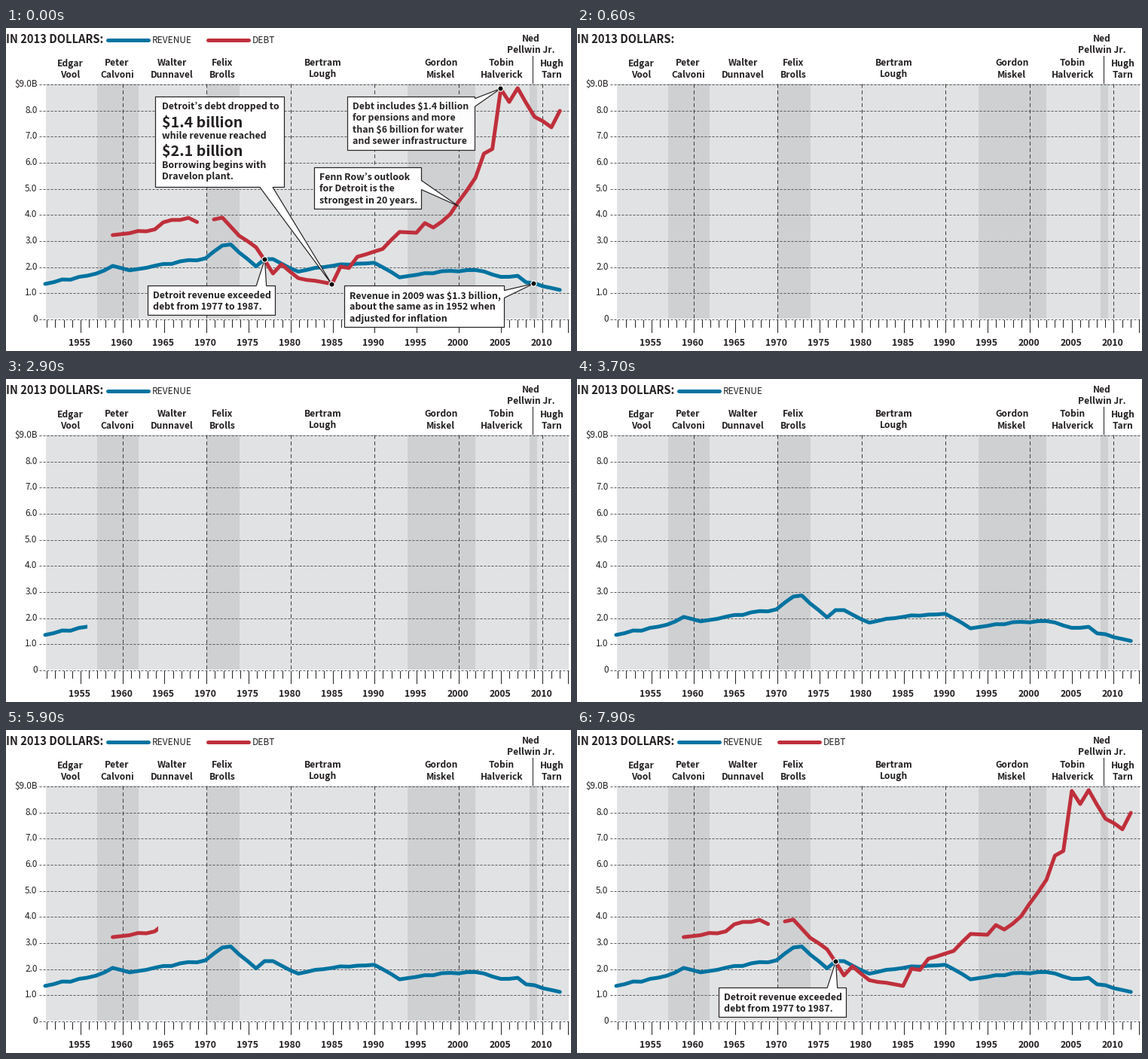
Recreate the animation shown at these times as a matplotlib script. Size 750 by 429 pixels, loop 8000 ms.

```python
import numpy as np
import matplotlib.pyplot as plt
from matplotlib.animation import FuncAnimation
from matplotlib.patches import Circle, Polygon, Rectangle

W, H, DPI = 750, 429, 64
PT = 72 / DPI  # points per pixel
STEP, FRAMES = 100, 80
TOP, BASE, UNIT = 74, 386, 34.67  # plot edges, pixels per billion
BLUE, RED = "#0073a0", "#bf2f3b"
LIGHT, DARK, INK = "#e1e2e3", "#cfd0d2", "#231f20"
TOP_SIDE, RIGHT_SIDE, BOTTOM_SIDE = range(3)

plt.rcParams["font.family"] = ["Noto Sans CJK JP", "Liberation Sans"]
rng = np.random.default_rng(4)

fig = plt.figure(figsize=(W / DPI, H / DPI), dpi=DPI, facecolor="white")
ax = fig.add_axes([0, 0, 1, 1])
ax.set_xlim(0, W)
ax.set_ylim(H, 0)
ax.axis("off")


def label(x, y, s, size=12, bold=True, ha="left", z=2):
    return ax.text(x, y, s, fontsize=size * PT, ha=ha, va="baseline",
                   weight="bold" if bold else "normal", color=INK,
                   zorder=z, parse_math=False)


def stroke(x, y, width=1, color=INK, z=1, **kw):
    return ax.plot(x, y, color=color, lw=width * PT, zorder=z, **kw)[0]


def year_x(year):
    return 98.4 + (year - 1955) * 11.155


def draw_terms():
    """Alternating bands, each with its mayor's name above the middle."""
    terms = [(1950.9, "Edgar", "Vool"), (1957, "Peter", "Calvoni"),
             (1962, "Walter", "Dunnavel"), (1970, "Felix", "Brolls"),
             (1974, "Bertram", "Lough"), (1994, "Gordon", "Miskel"),
             (2002, "Tobin", "Halverick"), (2008.5, "Ned", "Pellwin Jr."),
             (2009.4, "Hugh", "Tarn")]
    ends = [t[0] for t in terms[1:]] + [2013.1]
    for k, ((start, first, last), end) in enumerate(zip(terms, ends)):
        x0, x1 = year_x(start), year_x(end)
        ax.add_patch(Rectangle((x0, TOP), x1 - x0, BASE - TOP, lw=0,
                               fc=DARK if k % 2 else LIGHT, zorder=0))
        mid, y = (x0 + x1) / 2 - 1, 50.5
        if x1 - x0 < 20:  # too narrow: raise the name above a leader
            stroke([698.5, 698.5], [37, 73])
            mid, y = mid - 2, 18
        label(mid, y, first, ha="center")
        label(mid, y + 15, last, ha="center")


def draw_axes():
    for v in range(10):
        y = round(BASE - v * UNIT) + 0.5
        stroke([44, 747], [y, y], color="#58595b", ls=(0, (3, 2)))
        text = "$9.0B" if v == 9 else f"{v}.0" if v else "0"
        label(41.5, y + 3.5, text, 11.7, bold=False, ha="right")
    for year in range(1951, 2014):
        x = int(year_x(year)) + 0.5
        major = year % 5 == 0 or year == 2013
        stroke([x, x], [388, 404 if major else 397])
        if year % 5 == 0:
            label(x - 1, 421.5, str(year), 12.3, ha="center")
        if year % 10 == 0:
            stroke([x, x], [TOP, BASE], color="#3a3a3c", ls=(0, (5, 3.5)))


def legend(x, name, color):
    line = stroke([x + 2.5, x + 56.5], [15.5, 15.5], 5, color,
                  solid_capstyle="round")
    return [line, label(x + 62, 19.7, name, 11.9, bold=False)]


def series(points, color, z):
    """Yearly line through key points, with a slight wobble in between."""
    keys, values = zip(*points)
    years = np.arange(keys[0], keys[-1] + 1)
    wobble = rng.uniform(-0.04, 0.04, len(years))
    v = np.interp(years, keys, values) + wobble * ~np.isin(years, keys)
    return stroke(52 + (years - 1951) * 11.2, BASE - v * UNIT, 5, color, z,
                  solid_capstyle="round", solid_joinstyle="round")


def callout(box, side, span, tip, lines, dot=True, pad=7):
    """Note whose pointer leaves one side over a span of its length."""
    x0, y0, x1, y1 = box
    shape = [np.array(p) for p in [(x0, y0), (x1, y0), (x1, y1), (x0, y1)]]
    a, b = shape[side], shape[side + 1]
    shape[side + 1:side + 1] = [a + (b - a) * span[0], np.array(tip),
                                a + (b - a) * span[1]]
    parts = [ax.add_patch(Polygon(np.array(shape) + 0.5, fc="white", ec=INK,
                                  lw=1.2 * PT, zorder=6))]
    if dot:
        parts.append(ax.add_patch(Circle(np.add(tip, 0.5), 3.6, fc="black",
                                         ec="white", lw=1.2 * PT, zorder=7)))
    y = y0 + 2
    for text in lines:
        big = text.startswith("$")
        y += 23.5 if big else 15.2
        parts.append(label(x0 + pad, y, text, 19.6 if big else 12.35, z=8))
    return parts


def fade(parts, alpha):
    for p in parts:
        p.set_alpha(alpha)
        p.set_visible(alpha > 0)


def wipe(lines, edge):
    for line in lines:
        line.set_visible(edge > 0)
        line.set_clip_path(Rectangle((0, 0), max(edge, 1), H,
                                     transform=ax.transData))


draw_terms()
draw_axes()
label(0, 20.3, "IN 2013 DOLLARS:", 14.7)
revenue_key = legend(132, "REVENUE", BLUE)
debt_key = legend(265, "DEBT", RED)

revenue = [series([
    (1951, 1.33), (1957, 1.72), (1959, 2.02), (1961, 1.85), (1970, 2.31),
    (1972, 2.8), (1973, 2.84), (1976, 2.0), (1977, 2.28), (1978, 2.28),
    (1981, 1.8), (1985, 2.02), (1990, 2.14), (1993, 1.58), (1996, 1.74),
    (2002, 1.86), (2005, 1.6), (2007, 1.64), (2008, 1.39), (2012, 1.1)],
    BLUE, 3)]
debt = [
    series([(1959, 3.2), (1964, 3.42), (1965, 3.69), (1968, 3.86),
            (1969, 3.7)], RED, 4),
    series([
        (1971, 3.8), (1972, 3.87), (1974, 3.17), (1976, 2.73), (1978, 1.73),
        (1979, 2.08), (1981, 1.55), (1985, 1.33), (1986, 1.99), (1987, 1.94),
        (1988, 2.37), (1991, 2.67), (1993, 3.32), (1995, 3.29), (1996, 3.66),
        (1997, 3.49), (1999, 4.0), (2002, 5.4), (2003, 6.32), (2004, 6.5),
        (2005, 8.8), (2006, 8.3), (2007, 8.83), (2009, 7.73), (2011, 7.33),
        (2012, 7.96)], RED, 4)]

pensions = callout(
    (453, 91, 622, 162), RIGHT_SIDE, (0.03, 0.18), (656, 80),
    ["Debt includes $1.4 billion", "for pensions and more",
     "than $6 billion for water", "and sewer infrastructure"])
outlook = callout(
    (409, 185, 551, 240), RIGHT_SIDE, (0.31, 0.53), (600, 236),
    ["Fenn Row’s outlook", "for Detroit is the", "strongest in 20 years."],
    dot=False)
low = callout(
    (198, 91, 369, 211), BOTTOM_SIDE, (0.09, 0.19), (432, 340),
    ["Detroit’s debt dropped to", "$1.4 billion", "while revenue reached",
     "$2.1 billion", "Borrowing begins with", "Dravelon plant."], pad=9)
recent = callout(
    (449, 342, 661, 397), RIGHT_SIDE, (0.11, 0.29), (700, 339),
    ["Revenue in 2009 was $1.3 billion,", "about the same as in 1952 when",
     "adjusted for inflation"])
crossing = callout(
    (188, 342, 357, 381), TOP_SIDE, (0.85, 0.93), (343, 307),
    ["Detroit revenue exceeded", "debt from 1977 to 1987."])
notes = [pensions, outlook, low, recent, crossing]  # order of fading out


def ramp(i, start, length):
    return float(np.clip((i - start) / length, 0, 1))


def update(i):
    closing = i < 6
    fade(revenue_key, 1 if closing else ramp(i, 16, 3))
    fade(debt_key, 1 if closing else ramp(i, 46, 3))
    wipe(revenue, W if closing else 108 + 79.5 * (i - 29) if i >= 29 else 0)
    wipe(debt, W if closing else 202 + 67.5 * (i - 59) if i >= 59 else 0)
    for k, note in enumerate(notes):
        fade(note, 1 - ramp(i, k - 1, 6.5) ** 2 if closing else 0)
    if not closing:
        fade(crossing, ramp(i, 76, 3))
    return []


anim = FuncAnimation(fig, update, frames=FRAMES, interval=STEP, repeat=True,
                     repeat_delay=0, init_func=lambda: update(0))
plt.show()
```
